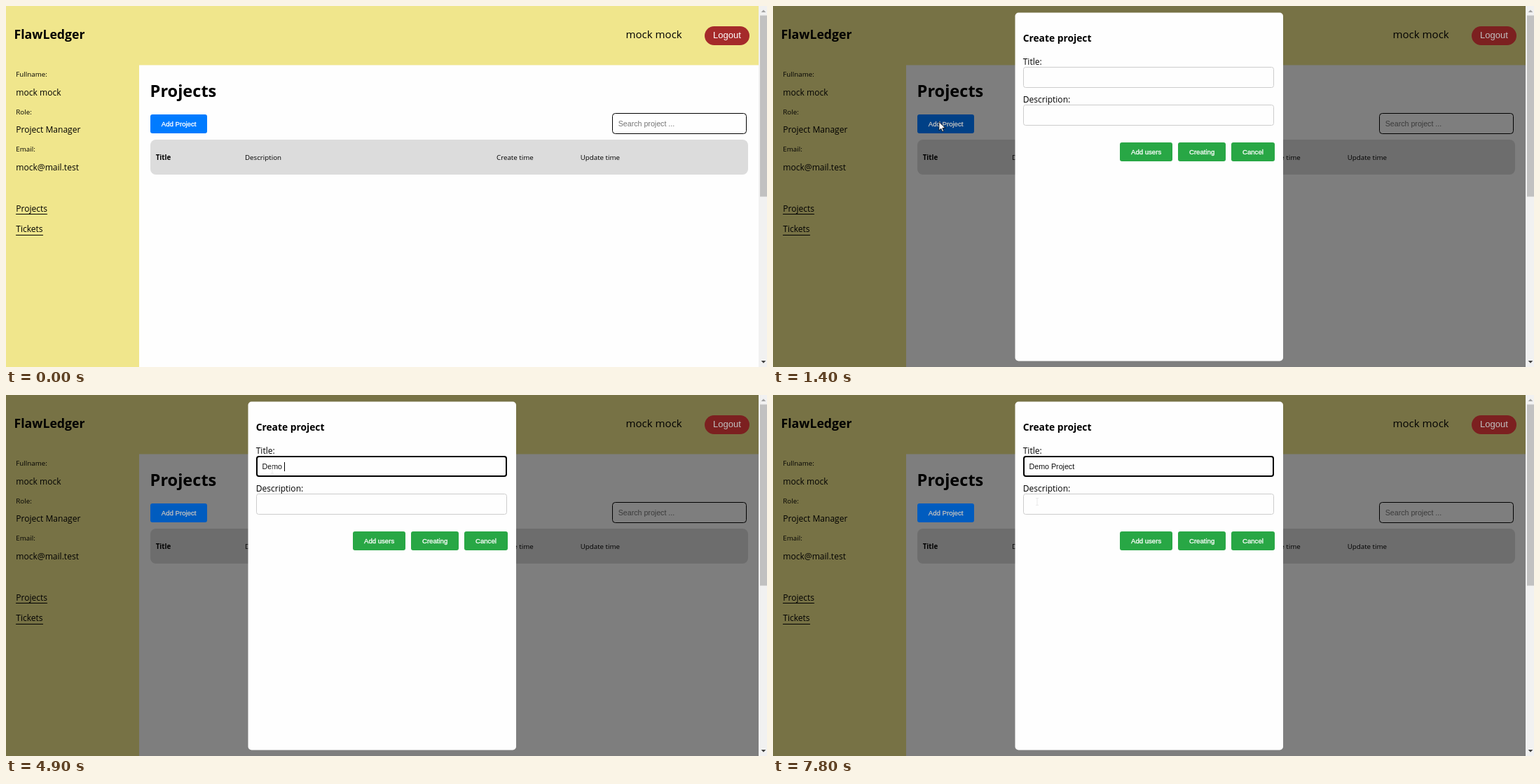
These frames come from a looping animation (1086 by 516 pixels, 8 s). An HTML page:

```html
<!DOCTYPE html>
<html lang="en">
<head>
<meta charset="utf-8">
<title>Project form</title>
<style>
  html, body { margin: 0; width: 100%; height: 100%; overflow: hidden; background: #fefefe; }
  svg { display: block; width: 1086px; height: 516px; }
  text { font-family: "Open Sans", "Noto Sans", sans-serif; font-size: 12.05px; white-space: pre; }
  .small { font-size: 9.75px; }
  .bold { font-weight: 700; }
  .arial { font-family: "Liberation Sans", Arial, sans-serif; }
  .button { font-size: 9.6px; fill: #fff; stroke: #fff; stroke-width: .3px; }
  .input { font-size: 10.67px; }
  .field { fill: #fefefe; stroke: #ccc; }
</style>
</head>
<body>
<svg viewBox="0 0 1086 516">
  <rect width="1086" height="516" fill="#fefefe"/>
  <path d="M0 0H1074V84.5H190V516H0z" fill="#f0e68c"/>

  <text class="bold" x="11.5" y="46.5" style="font-size:17.7px">FlawLedger</text>
  <text x="884.5" y="46" style="font-size:15.05px">mock mock</text>

  <text class="small" x="14.3" y="101.3">Fullname:</text>
  <text x="14.3" y="128">mock mock</text>
  <text class="small" x="14.3" y="154.5">Role:</text>
  <text x="14.3" y="181.3">Project Manager</text>
  <text class="small" x="14.3" y="208">Email:</text>
  <text x="14.3" y="234.6">mock@mail.test</text>
  <text x="14.3" y="293.6">Projects</text>
  <text x="14.3" y="323">Tickets</text>
  <path d="M14 297.5H59M14 327.5H53" stroke="#000"/>

  <text class="bold" x="205.6" y="130" style="font-size:23.55px">Projects</text>
  <rect x="865.5" y="153.5" width="191" height="29" rx="4" fill="#fefefe" stroke="#000"/>
  <text class="arial input" x="873.7" y="171.7" fill="#757575">Search project ...</text>
  <rect x="206" y="191" width="853" height="50" rx="8" fill="#dcdcdc"/>
  <text class="small bold" x="213.7" y="220.3">Title</text>
  <text class="small" x="341" y="220.3">Description</text>
  <text class="small" x="700" y="220.3">Create time</text>
  <text class="small" x="819.7" y="220.3">Update time</text>

  <rect id="shade" width="1074" height="516" opacity=".5"/>

  <g id="pageButtons">
    <rect x="997" y="29" width="64" height="27" rx="13.5" fill="#a52a2a"/>
    <text class="arial" x="1009" y="46.2" fill="#fff" style="font-size:13px">Logout</text>
    <rect id="add" x="206" y="155" width="81" height="27" rx="3"/>
    <text class="arial button" x="221.8" y="171.5">Add Project</text>
  </g>

  <g id="modal">
    <rect x="345.5" y="9.5" width="382.5" height="498" rx="5" fill="#fefefe"/>
    <text class="bold" x="356.7" y="51" style="font-size:13.8px">Create project</text>
    <text x="356.7" y="83.7">Title:</text>
    <rect class="field" x="357.5" y="87.5" width="357" height="29" rx="3"/>
    <rect id="focus" x="358" y="88" width="356" height="28" rx="3" fill="#fefefe" stroke="#000" stroke-width="2"/>
    <text id="typed" class="arial input" x="365.6" y="105.5" fill="#111"></text>
    <rect id="caret" y="96" width="1" height="13"/>
    <text x="356.7" y="138">Description:</text>
    <rect class="field" x="357.5" y="141.5" width="357" height="29" rx="3"/>
    <g fill="#28a745">
      <rect x="495" y="195" width="75" height="27" rx="3"/>
      <rect x="578" y="195" width="68" height="27" rx="3"/>
      <rect x="654" y="195" width="62" height="27" rx="3"/>
    </g>
    <text class="arial button" x="511" y="211.5">Add users</text>
    <text class="arial button" x="594" y="211.5">Creating</text>
    <text class="arial button" x="670" y="211.5">Cancel</text>
  </g>

  <rect x="1074" width="12" height="516" fill="#f1f1f1"/>
  <rect x="1076" y="13.5" width="10" height="259" fill="#c1c1c1"/>
  <path d="M1077.7 9h6.6l-3.3-3.6z" fill="#a3a3a3"/>
  <path d="M1077.7 507h6.6l-3.3 3.6z" fill="#404040"/>

  <g id="cursor">
    <path id="arrow" d="M.4 .5v12.4l2.9-2.7 1.9 4.3 2-.8-1.9-4.2h4z" fill="#fff" stroke="#000" stroke-width=".8"/>
    <path id="hand" d="M0 .6q1.6 0 1.6 1.5v4l4 .9q2 .4 2 2.2v2.8q0 2-1.2 3.2v2H0v-1.6l-3.8-4.6q-1.1-1.7.3-2.1 1-.2 1.9 1.2V2.1Q-1.6 .6 0 .6z" fill="#fff" stroke="#000" stroke-width=".9"/>
    <path id="beam" d="M-2 -5.5h4M0 -5.5v10M-2 4.5h4" fill="none" stroke="#e6e6e6" stroke-width=".8"/>
  </g>
</svg>
<script>
const LOOP = 8000, STEP = 100;
const byId = id => document.getElementById(id);
const show = (id, on) => byId(id).setAttribute('visibility', on ? 'visible' : 'hidden');

// [time, shape, x, y]
const cursorSteps = [
  [0, ''],
  [100, 'arrow', 960, 0], [200, 'arrow', 815, 62], [300, 'arrow', 600, 132],
  [400, 'arrow', 380, 190], [500, 'arrow', 185, 214], [600, 'arrow', 65, 212],
  [700, 'arrow', 19, 202], [800, 'arrow', 120, 186], [900, 'hand', 237, 166],
  [1400, 'arrow', 236.5, 165], [1500, 'arrow', 244, 162], [1600, 'arrow', 266, 154],
  [1700, 'arrow', 296, 142], [1800, 'arrow', 326, 131], [1900, 'arrow', 350, 123],
  [2000, 'arrow', 365, 118], [2100, 'arrow', 371, 116],
  [2200, ''], [2800, 'beam', 380, 107.5], [7700, 'beam', 378, 130], [7800, 'beam', 377, 153]
];
const phrase = 'Demo Project';
const keyTimes = [3800, 4100, 4200, 4500, 4900, 5400, 5700, 5900, 6300, 6500, 6700, 7100];

const ramp = (t, from, to) => Math.min(1, Math.max(0, (t - from) / (to - from)));
const mix = (a, b, k) => `rgb(${a.map((v, i) => Math.round(v + (b[i] - v) * k))})`;

function drawCursor(t) {
  const [, shape, x = 0, y = 0] = cursorSteps.findLast(step => step[0] <= t);
  for (const name of ['arrow', 'hand', 'beam']) show(name, name === shape);
  byId('cursor').setAttribute('transform', `translate(${x} ${y})`);
}

function drawField(t) {
  const focused = t >= 2800;
  const blinkedOff = t >= 3300 && t < 3800;
  const typed = byId('typed');
  typed.textContent = phrase.slice(0, keyTimes.filter(k => k <= t).length);
  const width = typed.textContent ? typed.getComputedTextLength() : 0;
  byId('caret').setAttribute('x', Math.round(365.6 + width));
  show('focus', focused);
  show('caret', focused && t < 7600 && !blinkedOff);
}

function draw(t) {
  const open = t >= 1400;
  show('shade', open);
  show('modal', open);
  byId('pageButtons').style.filter = open ? 'brightness(.75)' : '';
  const hover = ramp(t, 900, 1100) - ramp(t, 1400, 1700);
  byId('add').setAttribute('fill', mix([0, 123, 255], [0, 86, 179], hover));
  drawField(t);
  drawCursor(t);
}

const start = performance.now();
function tick() {
  const t = (performance.now() - start) % LOOP;
  draw(Math.floor(t / STEP) * STEP);
  requestAnimationFrame(tick);
}
tick();
</script>
</body>
</html>
```
